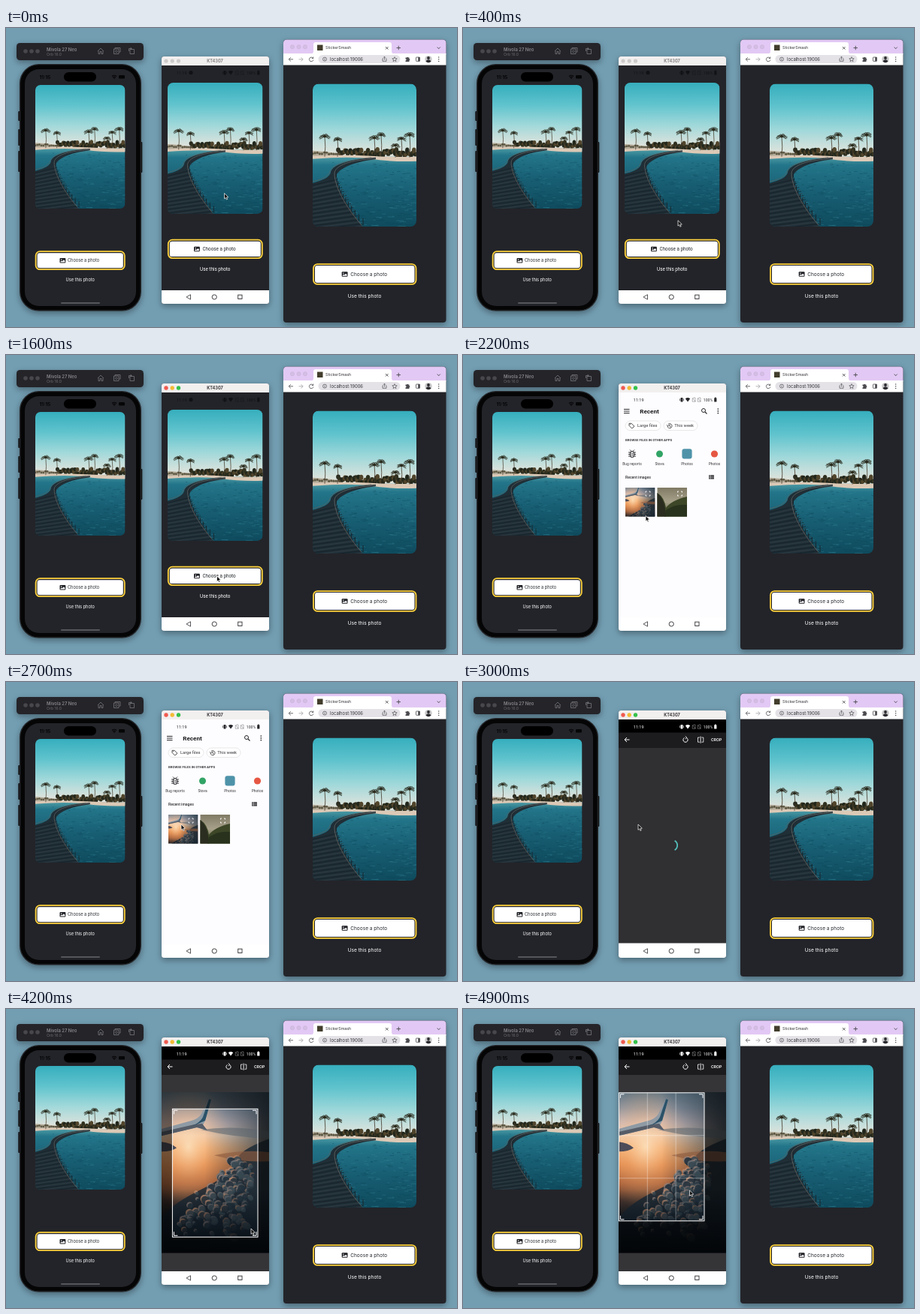
These frames come from a looping animation (600 px wide and 399 px high, 5 s). An HTML page:

```html
<!DOCTYPE html>
<html lang="en">
<head>
<meta charset="utf-8">
<title>Choosing a photo</title>
<style>
html, body { margin: 0; width: 100%; height: 100%; overflow: hidden; background: #739eb2; }
svg { display: block; }
#stage { width: 100vw; height: 100vh; }
text { font-family: Inter, "Liberation Sans", sans-serif; }
.r { font-family: Roboto, "Open Sans", sans-serif; }
.shadow { filter: drop-shadow(0 3px 4px rgba(0, 0, 0, .36)); }
</style>
</head>
<body>
<svg id="stage" viewBox="0 0 600 399" preserveAspectRatio="none"></svg>
<script>
const LOOP = 5000, STEP = 100;
const DARK = '#232429';

let seed = 11;
const rnd = (a, b) => {
  seed = (seed * 16807) % 2147483647;
  return +(a + (b - a) * seed / 2147483647).toFixed(2);
};
const many = (n, f) => Array.from({ length: n }, (_, i) => f(i)).join('');

const rect = (x, y, w, h, fill, r = 0, more = '') =>
  `<rect x="${x}" y="${y}" width="${w}" height="${h}" rx="${r}" fill="${fill}" ${more}/>`;
const dot = (x, y, r, fill, more = '') => `<circle cx="${x}" cy="${y}" r="${r}" fill="${fill}" ${more}/>`;
const shape = (d, fill, more = '') => `<path d="${d}" fill="${fill}" ${more}/>`;
const line = (d, color, w = .8, more = '') =>
  `<path d="${d}" fill="none" stroke="${color}" stroke-width="${w}" ${more}/>`;
const text = (x, y, size, fill, s, more = '') =>
  `<text x="${x}" y="${y}" font-size="${size}" fill="${fill}" ${more}>${s}</text>`;
const roboto = 'class="r"', mid = 'text-anchor="middle"';
const group = (id, body) => `<g id="${id}">${body}</g>`;
const stops = list => list.map(([o, c, a = 1]) => `<stop offset="${o}" stop-color="${c}" stop-opacity="${a}"/>`).join('');
const vertical = (id, list) => `<linearGradient id="${id}" x2="0" y2="1">${stops(list)}</linearGradient>`;

// Beach photo, 138 x 190
function palm(x, y, base, s) {
  const fronds = many(13, i => {
    const a = Math.PI * (.86 + i / 12 * 1.28), r = s * rnd(.75, 1.1);
    const dx = Math.cos(a) * r, dy = Math.sin(a) * r * .8;
    return `M${x} ${y}q${dx * .55} ${dy * .9} ${dx} ${dy * .75 + r * .22}`;
  });
  return line(`M${x} ${y}Q${x + 1.5} ${(y + base) / 2} ${x} ${base}`, '#453a2b', .8) +
    line(fronds, '#2a2a1c', .8) + dot(x, y, s * .25, '#2a2a1c');
}
const palms = [[16, 70, 97, 7], [33, 74, 97, 6.5], [82, 72, 96, 7], [91, 68, 96, 7],
  [110, 82, 98, 6], [118, 73, 97, 6.5], [129, 68, 98, 8]];

function beach() {
  const bushes = many(60, i => {
    const x = 34 + i * 1.8;
    return `<ellipse cx="${x}" cy="${rnd(88, 95)}" rx="2.8" ry="${rnd(2, 4.5)}" fill="${['#22261b', '#30301f', '#51452c'][i % 3]}"/>`;
  });
  const ripples = many(230, i => {
    const y = 105 + 85 * i / 230, w = rnd(2, 4 + (y - 100) / 12);
    return line(`M${rnd(24, 138)} ${y}q${w / 2} ${rnd(-.9, .9)} ${w} 0`, i % 2 ? '#348597' : '#0c4357', .6, 'opacity=".65"');
  });
  const planks = many(24, i => {
    const y = 132 + i * 2.7;
    return line(`M0 ${y + 3}L${31 + Math.max(0, y - 128) * .55} ${y - 5}`, i % 2 ? '#35434a' : '#121d24', .7);
  });
  const posts = many(13, i => {
    const u = i / 12, x = 31 + 34 * u * u + 2 * u, y = 119 + 69 * u;
    return line(`M${x} ${y}v${-5 - 4 * u}`, '#18242b', 1);
  });
  return rect(0, 0, 138, 102, 'url(#sky)') + rect(0, 97, 138, 93, 'url(#sea)') +
    shape('M0 89Q20 90 36 93V98H0Z', '#b3aa98') + many(12, i => dot(i * 3.1, rnd(91, 94), 1.6, '#5e5944')) + bushes +
    shape('M0 96Q45 94 78 96T138 97V103Q105 104 78 100T0 100Z', '#dcc9b6') +
    palms.map(p => palm(...p)).join('') + ripples +
    shape('M84 98C50 100 25 108 24 118C22 126 8 130 0 132V190H66C52 170 32 142 31 124C32 114 52 104 84 100.5Z', '#202e36') +
    planks + posts +
    line('M84 99.5C50 101.5 30 108 29 119C29 140 49 170 65 188', '#6f706a', .7) +
    line('M78 98C48 101 25 107 23 117C20 125 9 128 0 130', '#59605d', .7);
}

// Sunset photo, 143 x 214
function sunset() {
  const clouds = many(190, i => {
    const u = i / 190, depth = rnd(0, 1), edge = 96 - 80 * u;
    const x = edge + depth * (25 + 70 * u) + rnd(-7, 7), y = 88 + 92 * u + rnd(-9, 9) + depth * 8;
    const r = rnd(2, 5.5), lit = ['#c48f70', '#8f7f7a', '#6d7378'][i % 3];
    return dot(x, y, r, lit, `opacity="${(.85 - depth * .55).toFixed(2)}"`) +
      dot(x + 1.4, y + 1.7, r, i % 2 ? '#35454f' : '#1f2e39', 'opacity=".85"');
  });
  return rect(0, 0, 143, 214, 'url(#dusk)') + rect(0, 0, 143, 214, 'url(#glow)') + rect(0, 0, 143, 214, 'url(#side)') +
    `<g filter="url(#soft)">${shape('M143 62Q100 78 100 92T48 132T0 178V214H143Z', '#1c2a35', 'opacity=".85"')}
    ${shape('M52 50Q95 44 143 52V62Q95 60 52 50Z', '#58636c', 'opacity=".55"')}
    ${shape('M70 84Q110 76 143 80V92Q105 94 70 84Z', '#8f5c40', 'opacity=".65"')}${clouds}</g>` +
    rect(0, 130, 143, 84, 'url(#night)') +
    shape('M0 49L36 39Q49 36 53 29L63 9L66 10L58 38Q56 42 55 44L61 51L47 47L0 58Z', '#8e9aa4') +
    shape('M0 53L44 43L54 42L61 51L47 47L0 58Z', '#565d68') +
    shape('M63 9L66 10L58 38L39 46Q52 40 55 33Z', '#2b5269') +
    shape('M0 66Q12 67 20 74Q14 79 0 79Z', '#4d4c58');
}

const gallery = (x, y, s) => `<g transform="translate(${x} ${y}) scale(${s})">` +
  rect(0, .2, 8, 6.6, '#202126', 1) + dot(2.3, 2.3, .75, '#fff') +
  shape('M1 5.8V5L2.6 3.7L3.7 4.6L5.5 2.6L7 4.3V5.8Z', '#fff') + '</g>';

function appScreen(x, y, w, h, b, useY, size, font, iconX, labelX) {
  const cx = x + w / 2;
  return `<use href="#beach" x="${x}" y="${y}" width="${w}" height="${h}"/>` +
    rect(b[0], b[1], b[2], b[3], 'none', 5.5, 'stroke="#ffd33d" stroke-width="1.8"') +
    rect(b[0] + 2, b[1] + 2, b[2] - 4, b[3] - 4, '#fff', 3.2) +
    gallery(iconX, b[1] + b[3] / 2 - 3.4, .98) +
    text(labelX, b[1] + b[3] / 2 + size * .36, size, '#25292e', 'Choose a photo', font) +
    text(cx, useY, size, '#fff', 'Use this photo', font + ' ' + mid);
}

function phone() {
  const gray = '#77787d';
  return `<g class="shadow">${rect(14, 20, 169, 23, '#242429', 4.5)}</g>` +
    [26, 34, 42].map(x => dot(x, 31, 2.8, '#47474c')).join('') +
    text(54, 30.7, 5.9, '#85858a', 'Mivola 27 Neo', 'font-weight="600"') +
    text(54, 37, 5.1, '#6c6c71', 'Orb 16.0') +
    line('M122 31L126 27L130 31M123 30.5V34.5H125V31.5H127V34.5H129V30.5', gray) +
    line('M145 28V26.5H152V32H150.5M143.5 28H150V34.5H143.5ZM146.7 30a1.3 1.3 0 1 0 .1 0', gray) +
    line('M165 28.5H170.5V34.5H165ZM163.5 31V27.5H167M165.6 25.8L167.2 27.5L165.6 29.2', gray) +
    rect(16.3, 111, 4, 13, '#17171a', 1) + rect(16.3, 135, 4, 22, '#17171a', 1) +
    rect(16.3, 164, 4, 28, '#17171a', 1) + rect(178, 152, 3.3, 41, '#17171a', 1) +
    `<g class="shadow">${rect(18.7, 48.7, 160.6, 328.3, '#050506', 25, 'stroke="#25272b" stroke-width="1.3"')}</g>` +
    rect(25, 55, 148, 316, DARK, 19) + rect(77, 59, 43, 12.5, '#000', 6.2) +
    text(44.5, 67.8, 6.6, '#060607', '11:15', 'font-weight="700"') +
    line('M141 64.5Q144 62 147 64.5M142.2 66Q144 64.8 145.8 66', '#060607', 1.2) + dot(144, 67.2, .8, '#060607') +
    rect(150, 63, 8, 4.6, '#060607', 1.3) +
    rect(73, 366, 52, 2, '#55565b', 1) +
    appScreen(39, 76, 119.5, 165, [39.6, 298.2, 118.2, 24], 338, 5.65, '', 71.5, 82);
}

function browser() {
  const ink = '#4b4b50';
  return `<g class="shadow">${rect(369, 15.5, 216.5, 377.5, DARK, 4)}</g>` +
    shape('M369 35V20Q369 15.5 373.5 15.5H581Q585.5 15.5 585.5 20V35Z', '#e2c9f5') +
    [381, 389.5, 398].map(x => dot(x, 25.2, 2.6, '#d5bee5', 'stroke="#c4aed3" stroke-width=".5"')).join('') +
    shape('M406 34.5Q409 34 409 31V22Q409 19 412 19H510Q513 19 513 22V31Q513 34 516 34.5Z', '#fff') +
    rect(369, 34, 216.5, 15.5, '#fff') +
    rect(414, 22.5, 7.5, 7.5, '#423d2c') +
    text(425, 28.4, 5.3, '#333338', 'StickerSmash') +
    line('M505 25L508.5 28.5M508.5 25L505 28.5M519.5 26.5H525M522.25 23.8V29.2M573.7 25.5L575.7 27.7L577.7 25.5', ink, .9) +
    rect(415.5, 36, 109, 11, '#e4e2e6', 5.5) +
    line('M382 41.8H376.3M378.8 39.2L376.2 41.8L378.8 44.4', ink) +
    line('M389.5 41.8H395M392.5 39.2L395.1 41.8L392.5 44.4', '#a0a0a5') +
    line('M408.4 40.2A2.8 2.8 0 1 0 408.9 42.5M408.8 38.5V40.5H406.8', ink) +
    dot(424, 41.6, 2.5, 'none', `stroke="${ink}" stroke-width=".7"`) + line('M424 41.2V43M424 40V40.5', ink, .7) +
    text(431, 43.8, 5.9, '#333338', 'localhost:19006') +
    line('M501.7 40.8H501V44.3H506V40.8H505.3M503.5 42.5V38.2M502.1 39.6L503.5 38.1L504.9 39.6', ink, .7) +
    line('M517 38.6L517.9 40.7L520.2 40.9L518.4 42.4L519 44.6L517 43.4L515 44.6L515.6 42.4L513.8 40.9L516.1 40.7Z', ink, .7) +
    shape('M531.5 39.5H533.1A1.2 1.2 0 0 1 535.4 39.5H536.5V41A1.2 1.2 0 0 1 536.5 43.3V45H531.5V43.4A1.1 1.1 0 0 0 531.5 41.2Z', ink) +
    rect(545.5, 39, 5, 5.3, 'none', .5, `stroke="${ink}" stroke-width=".8"`) + rect(548.2, 39, 2.3, 5.3, ink) +
    dot(562, 41.6, 4.7, '#c9c8c9') + dot(562, 40, 1.9, '#29282d') + shape('M558.4 44.6Q562 39.7 565.6 44.6Q562 47.9 558.4 44.6Z', '#29282d') +
    [39, 41.7, 44.4].map(y => dot(575.7, y, .75, ink)).join('') +
    appScreen(408, 74.5, 138, 190.5, [409, 315.1, 136.5, 26.8], 360.3, 6.55, '', 446.7, 458.2);
}

const statusRow = c => text(226.8, 62.3, 5.5, c, '11:19', roboto) +
  rect(289.6, 57, 2.8, 5.5, c, .6) + line('M288.6 58.3V61.2M293.4 58.3V61.2', c, .7) +
  shape('M295.8 58.2Q299 55.8 302.2 58.2L299 62.5Z', c) +
  line('M305.2 62.2V58.5L307 57H309V62.2ZM312.2 62.2V58.5L314 57H316V62.2ZM305 57.3L309.5 62.3M312 57.3L316.5 62.3', c, .6, 'opacity=".55"') +
  text(319.8, 62.2, 5.1, c, '100%', roboto) + rect(334.2, 57.2, 3.2, 5.4, c, .5) + rect(335, 56.5, 1.6, 1, c);

function picker() {
  const ink = '#252529';
  const apps = [[225, 'Bug reports'], [261.5, 'Stova'], [298, 'Photos'], [334.5, 'Photos']];
  const chip = (x, w, tx, s) => rect(x, 88, w, 12.6, '#fff', 6.3, 'stroke="#dededf" stroke-width=".7"') +
    text(tx, 96.2, 5.75, '#37373b', s, roboto);
  const expand = x => line(`M${x - 3} 183.5V182H${x - 1.5}M${x + 1.5} 182H${x + 3}V183.5M${x + 3} 186.5V188H${x + 1.5}M${x - 1.5} 188H${x - 3}V186.5`, '#fff', .9);
  return rect(207, 50, 143, 300, '#fdfcfe') + statusRow(ink) +
    line('M214 72.4H221.5M214 75H221.5M214 77.6H221.5', ink, 1) +
    text(235.3, 78, 8.1, '#1b1b1e', 'Recent', roboto + ' font-weight="600"') +
    dot(320, 74, 2.5, 'none', `stroke="${ink}"`) + line('M322 76L324.5 78.5', ink, 1.1) +
    [72, 74.8, 77.6].map(y => dot(339.3, y, .85, ink)).join('') +
    chip(216, 47, 232, 'Large files') + chip(267, 45, 281.2, 'This week') +
    line('M221 91.3H224L228 95.2L224.7 98L221 94.3Z', ink, .8) + dot(222.6, 92.8, .5, ink) +
    line('M272 95A3 3 0 1 0 273 92.4M271 93.2L272.7 95L274.2 93.3M275 92.7V95L276.5 96', ink) +
    text(216, 115.3, 4.35, '#3a3a3e', 'BROWSE FILES IN OTHER APPS', roboto + ' font-weight="600"') +
    rect(222.6, 128.5, 4.8, 7.8, 'none', 2.4, `stroke="${ink}" stroke-width="1.1"`) +
    line('M220 130H222.5M220 132.5H222.5M220 135H222.5M227.5 130H230M227.5 132.5H230M227.5 135H230M224 131.3H226M224 133.5H226M223.5 128L222 126.5M226.5 128L228 126.5', ink, .9) +
    dot(261.5, 132, 4.5, '#32a466') + rect(291.4, 125.2, 13.2, 13.2, '#4f93a9', 3) + dot(334.5, 132, 4.6, '#e65743') +
    apps.map(([x, s]) => text(x, 147.3, 4.9, '#37373b', s, roboto + ' ' + mid)).join('') +
    text(216, 164.5, 5.1, '#303034', 'Recent images', roboto + ' font-weight="500"') +
    rect(327, 160.2, 7, 5.4, ink, .5) + line('M327 162H334M327 163.8H334M329 160V165.6', '#fff', .5) +
    '<svg x="216" y="177" width="39.5" height="38.5" viewBox="0 12 143 139"><use href="#sunset" width="143" height="214"/></svg>' +
    rect(258.5, 177, 39.5, 38.5, 'url(#mist)') +
    shape('M258.5 184Q268 190 270 204Q277 194 298 189V215.5H258.5Z', '#3d4728') +
    shape('M258.5 184Q269 193 270 215.5H258.5Z', '#2a2d20') + shape('M270 207Q283 198 298 200V215.5H268Z', '#29321d') +
    expand(246) + expand(288.5);
}

const cropper = () => rect(207, 50, 143, 300, '#302f32') + rect(207, 50, 143, 18, '#000') + rect(207, 67.5, 143, 20.5, '#1c1b1e') +
  statusRow('#fff') +
  line('M221.5 77H215M218 74L215 77L218 80', '#fff', 1) +
  line('M294.6 74.4A3.1 3.1 0 1 0 297.4 74.4M295.8 72.5L297.8 74.3L295.8 76', '#fff', 1) +
  line('M314.8 74H312.5V80.2H314.8M317.5 74H319.8V80.2H317.5', '#fff') + line('M316.1 72.5V81.7', '#fff', .9) +
  text(330, 79.3, 5.5, '#fff', 'CROP', roboto + ' font-weight="500"') +
  group('spinner', line('M281.6 211.8A7.2 7.2 0 0 1 281.6 224.2', '#55c0bd', 1.8)) +
  group('canvas', rect(207, 88, 143, 262, '#353437') +
    '<use href="#sunset" x="207" y="111" width="143" height="214.5"/>' +
    '<path id="shade" fill="#000" fill-opacity=".53" fill-rule="evenodd"/>' +
    group('crop', rect(0, 0, 113.6, 171, 'none', 0, 'stroke="#fff" stroke-width="1"') +
      line('M2 7V2H7M106.6 2H111.6V7M111.6 164V169H106.6M7 169H2V164', '#fff', 1) +
      group('thirds', line('M37.9 0V171M75.7 0V171M0 57H113.6M0 114H113.6', '#fff', .6, 'opacity=".6"'))));

function mirror() {
  return `<g class="shadow">${rect(207, 38, 143, 330, DARK, 3)}</g>` +
    shape('M207 50V41Q207 38 210 38H347Q350 38 350 41V50Z', '#f2efef') +
    group('idle', [213, 221.2, 229.5].map(x => dot(x, 44, 2.6, '#cdcaca')).join('')) +
    group('active', dot(213, 44, 2.7, '#f05b50') + dot(221.2, 44, 2.7, '#f3bb35') + dot(229.5, 44, 2.7, '#35c14a')) +
    `<text id="title" x="278" y="46.2" font-size="5.6" font-weight="700" ${mid}>KT4307</text>` +
    group('home', statusRow('#111216') + dot(246, 59.6, 2.6, '#111216') +
      appScreen(215, 73, 126.5, 175, [215.8, 282.7, 125, 24.4], 324.3, 6.3, roboto, 250, 261.5)) +
    group('picker', picker()) + group('cropper', cropper()) +
    '<path id="nav" fill="#fff"/>' +
    line('M245.5 355.8V362.2L240 359Z', '#303034') + dot(277.2, 359, 3.1, 'none', 'stroke="#303034" stroke-width=".9"') +
    rect(308.7, 356.2, 5.3, 5.3, 'none', 0, 'stroke="#303034" stroke-width=".9"');
}

const stage = document.getElementById('stage');
stage.innerHTML = '<defs>' +
  vertical('sky', [[0, '#36aebd'], [.3, '#5fc3cd'], [.6, '#9fd8da'], [.9, '#dfe3dc']]) +
  vertical('sea', [[0, '#4d9ba5'], [.12, '#237589'], [.5, '#185f74'], [1, '#0f4b5e']]) +
  vertical('dusk', [[0, '#5f7482'], [.1, '#8a93a1'], [.19, '#c9babd'], [.27, '#efd5c0'], [.35, '#f0b27d'],
    [.45, '#dd874c'], [.57, '#a45c37'], [.68, '#48362f'], [.8, '#121b23'], [1, '#05080c']]) +
  vertical('night', [[0, '#070d14', 0], [1, '#05090e', .95]]) +
  vertical('mist', [[0, '#807a65'], [.5, '#a8a18a'], [1, '#4c5336']]) +
  `<linearGradient id="side">${stops([[.4, '#22333f', 0], [1, '#22333f', .8]])}</linearGradient>` +
  `<radialGradient id="glow" cx=".25" cy=".34" r=".4">${stops([[0, '#ffe6c2', .75], [.5, '#ffb877', .35], [1, '#ffb877', 0]])}</radialGradient>` +
  '<filter id="soft"><feGaussianBlur stdDeviation=".6"/></filter>' +
  `<clipPath id="round">${rect(0, 0, 138, 190, '#000', 8)}</clipPath>` +
  `<symbol id="beach" viewBox="0 0 138 190" preserveAspectRatio="none"><g clip-path="url(#round)">${beach()}</g></symbol>` +
  `<symbol id="sunset" viewBox="0 0 143 214" preserveAspectRatio="none">${sunset()}</symbol></defs>` +
  rect(0, 0, 600, 399, '#739eb2') + phone() + mirror() + browser() +
  group('cursor', shape('M0 0V7.4L1.7 5.9L2.9 8.5L4.2 7.9L3 5.4L5.3 5.2Z', '#111', 'stroke="#fff" stroke-width=".7"'));

const $ = id => document.getElementById(id);
const show = (id, on) => $(id).setAttribute('display', on ? 'inline' : 'none');
const move = (id, x, y) => $(id).setAttribute('transform', `translate(${x} ${y})`);

// Moments at which the window changes
const FOCUS = 800, PICK = 1900, OPEN = 2900, LOADED = 3400, DRAG = 4400;
const grab = [316, 267];

// Pointer path: time, x, y
const path = [[0, 290.5, 220.5], [100, 290.5, 220.5], [700, 281.5, 293], [1600, 280.5, 295], [PICK, 280.5, 295],
  [2200, 243, 214.5], [2500, 233, 190], [3500, 233, 190], [4000, 326, 293],
  [4200, 326, 293], [DRAG, ...grab], [4900, 301.5, 242], [LOOP, 301.5, 242]];

function pointer(t) {
  const i = path.findIndex(p => p[0] > t);
  const [t0, x0, y0] = path[i - 1], [t1, x1, y1] = path[i];
  const u = (t - t0) / (t1 - t0), e = u * u * (3 - 2 * u);
  return [x0 + (x1 - x0) * e, y0 + (y1 - y0) * e];
}

function draw(t) {
  const [x, y] = pointer(t);
  const active = t >= FOCUS, cropping = t >= OPEN, loaded = t >= LOADED, drag = t >= DRAG;
  show('idle', !active);
  show('active', active);
  $('title').setAttribute('fill', active ? '#3b393b' : '#858283');
  show('home', t < PICK);
  show('picker', t >= PICK && !cropping);
  show('cropper', cropping);
  show('canvas', loaded);
  show('thirds', drag);
  $('spinner').setAttribute('transform', `rotate(${(t - 3000) * .36} 278 218)`);
  const top = cropping && !loaded ? 348.5 : 350;
  $('nav').setAttribute('d', `M207 ${top}H350V365Q350 368 347 368H210Q207 368 207 365Z`);
  // The crop box follows the drag but stays on the photo
  const cx = drag ? Math.max(207.4, 221.4 + x - grab[0]) : 221.4;
  const cy = drag ? Math.max(111.8, 133.3 + y - grab[1]) : 133.3;
  move('crop', cx, cy);
  $('shade').setAttribute('d', `M207 111H350V325.5H207ZM${cx} ${cy}h113.6v171h-113.6Z`);
  move('cursor', x, y);
}

const start = performance.now();
function tick() {
  const t = (performance.now() - start) % LOOP;
  draw(Math.floor(t / STEP) * STEP);
  requestAnimationFrame(tick);
}
tick();
</script>
</body>
</html>
```
